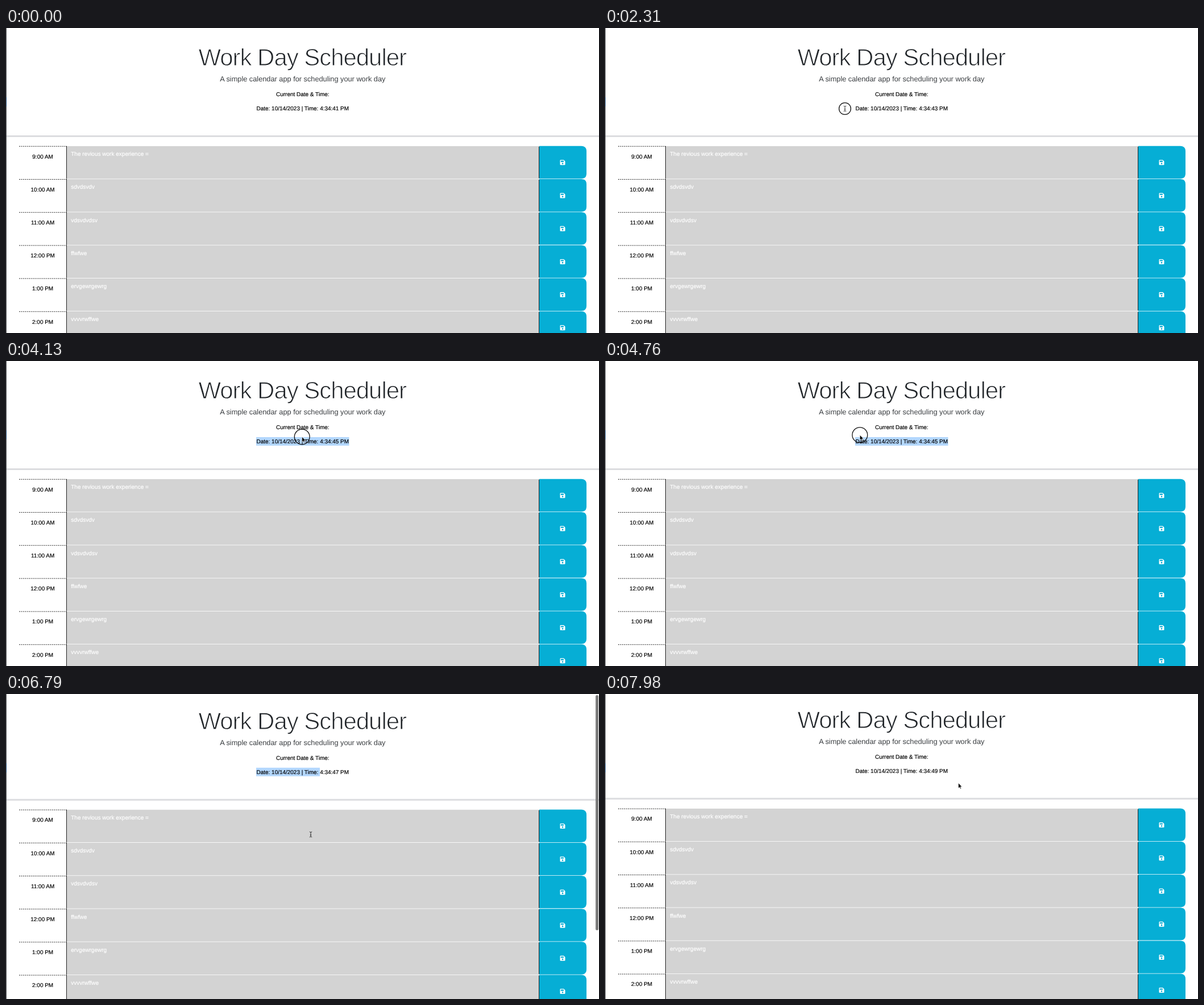
Animation, 1043 px wide and 537 px high, one loop 8 s. Source, as an HTML page:

```html
<!DOCTYPE html>
<html lang="en">
<head>
<meta charset="utf-8">
<title>Work Day Scheduler</title>
<style>
html, body { margin: 0; width: 100%; height: 100%; overflow: hidden; background: #fff; }
svg { display: block; width: 1043px; height: 537px; }
text {
  font: 9.96px "Liberation Sans", Arial, sans-serif;
  text-rendering: geometricPrecision;
  fill: #000; stroke: #000; stroke-width: .18px;
}
.mid { text-anchor: middle; }
/* A white outline thins the regular face to a light weight. */
.title { font-size: 42px; letter-spacing: -1.05px; fill: #212529; stroke: #fff; stroke-width: 1.1px; }
.lead { font-size: 12.75px; fill: #212529; stroke: #fff; stroke-width: .12px; }
.note { font-size: 10.03px; fill: #fff; stroke: #fff; }
</style>
</head>
<body>
<svg viewBox="0 0 1043 537">
  <g id="page">
    <text class="mid title" x="521.2" y="66.2">Work Day Scheduler</text>
    <text class="mid lead" x="521.8" y="94.1">A simple calendar app for scheduling your work day</text>
    <text class="mid" x="521.8" y="120">Current Date &amp; Time:</text>
    <rect id="mark" x="440" y="134" height="15" fill="#b3d7fe"/>
    <text class="mid" id="clock" x="521.8" y="145"></text>
    <rect x="1" y="189" width="1042" height="3" fill="#dcdde0"/>
    <g id="rows"></g>
  </g>
  <rect width="1" height="537" fill="#55585c"/>
  <rect y="122" width="1" height="16" fill="#24507e"/>
  <rect id="bar" x="1037" width="5" height="414" rx="2.5" fill="#7d7d7d"/>
  <circle id="ring" fill="none" stroke="#111" stroke-width="1.3"/>
  <g id="cursor">
    <path id="arrow" d="M0 0V9.2L2.1 7.3L3.5 10.4L5 9.7L3.6 6.7H6.4Z" fill="#000" stroke="#fff" stroke-width=".6"/>
    <path id="beam" d="M-2.2-4.6Q0-4.6 0-3.3Q0-4.6 2.2-4.6M0-3.3V3.3M-2.2 4.6Q0 4.6 0 3.3Q0 4.6 2.2 4.6M-1.2 1H1.2"
      fill="none" stroke="#222" stroke-width=".9"/>
  </g>
</svg>
<script>
const LOOP = 8000, TICK = 70;
const $ = id => document.getElementById(id);
const clamp = v => Math.min(1, Math.max(0, v));
const ease = v => v * v * (3 - 2 * v);
const set = (id, attrs) => {
  for (const k in attrs) $(id).setAttribute(k, attrs[k]);
};

const entries = [
  ["9:00 AM", "The revious work experience ="],
  ["10:00 AM", "sdvdsvdv"],
  ["11:00 AM", "vdsvdvdsv"],
  ["12:00 PM", "ffwfwe"],
  ["1:00 PM", "ervgewrgewrg"],
  ["2:00 PM", "vvvvrwffwe"]
];
$("rows").innerHTML = entries.map(([hour, note], i) => `
  <g transform="translate(0 ${(208 + 58.2 * i).toFixed(1)})">
    <path d="M23 .3H106.5" stroke="#111" stroke-width=".9" stroke-dasharray="2 1.4"/>
    <rect x="107" width="830.5" height="57.4" fill="#d3d3d3"/>
    <path d="M106.5 0V57.6" stroke="#222"/>
    <path d="M938 -.2H1012q9 0 9 9V48.2q0 9-9 9H938Z" fill="#06aed5"/>
    <path d="M937.5 .8V56.6" stroke="#222"/>
    <text class="mid" x="64.6" y="21.6">${hour}</text>
    <text class="note" x="114.2" y="17.2">${note}</text>
    <path transform="translate(979 28.8)" fill="#fff" fill-rule="evenodd"
      d="M-4.5-3.5q0-1 1-1H2L4.5-2V3.5q0 1-1 1H-3.5q-1 0-1-1ZM-3.2-3.2V-.9H1.9V-3.2ZM0 .4a1.4 1.4 0 1 0 .01 0Z"/>
  </g>`).join("");

// Pointer moves: start, end, destination
const moves = [
  [490, 770, 430, 222],
  [1050, 1260, 378, 164],
  [1680, 2310, 422, 142],
  [2520, 2800, 512, 133],
  [3360, 3780, 614, 136],
  [3780, 4130, 520.7, 133.5],
  [4410, 4690, 448.3, 130.3],
  [4900, 5180, 446, 132.5],
  [5810, 6020, 536, 247.3],
  [7070, 7420, 621.5, 156.7]
];
// Mouse button: down, up
const presses = [[2310, 4130], [4620, 4760], [5110, 5180]];

function pointAt(t) {
  let x = 430, y = 499;
  for (const [from, to, toX, toY] of moves) {
    const f = ease(clamp((t - from) / (to - from)));
    x += (toX - x) * f;
    y += (toY - y) * f;
  }
  return [x, y];
}

// The ring holds while pressed, then widens and fades within two ticks.
function ringAt(t) {
  const press = presses.find(([down, up]) => t >= down && t < up + 2 * TICK);
  if (!press) return { r: 0, opacity: 0 };
  const grown = Math.max(0, (t - press[1]) / TICK + 1);
  return { r: 10.4 + 3 * grown, opacity: grown > 1 ? .4 : 1 };
}

function markWidth(t) {
  if (t < 3430 || t >= 7420) return 0;
  return t < 4900 ? 163.5 : 112;
}

function draw(now) {
  const t = Math.floor((now % LOOP) / TICK) * TICK;
  const [x, y] = pointAt(t);
  const overText = (y >= 138 && y <= 152) || y > 205;
  const scroll = 6.2 * clamp((t - 6640) / 220);
  const sec = 42 + Math.floor((t - 740) / 1028);

  $("clock").textContent = `Date: 10/14/2023 | Time: 4:34:${sec} PM`;
  set("page", { transform: `translate(0 ${-scroll})` });
  set("mark", { width: markWidth(t) });
  set("bar", { y: 1 + scroll * .25, opacity: t < 6720 ? 0 : clamp((7630 - t) / 280) });
  set("ring", { cx: x, cy: y, ...ringAt(t) });
  set("cursor", { transform: `translate(${x} ${y})`, opacity: t >= moves[0][0] ? 1 : 0 });
  set("arrow", { opacity: overText ? 0 : 1 });
  set("beam", { opacity: overText ? 1 : 0 });
}

const start = performance.now();
function frame() {
  draw(performance.now() - start);
  requestAnimationFrame(frame);
}
frame();
</script>
</body>
</html>
```
